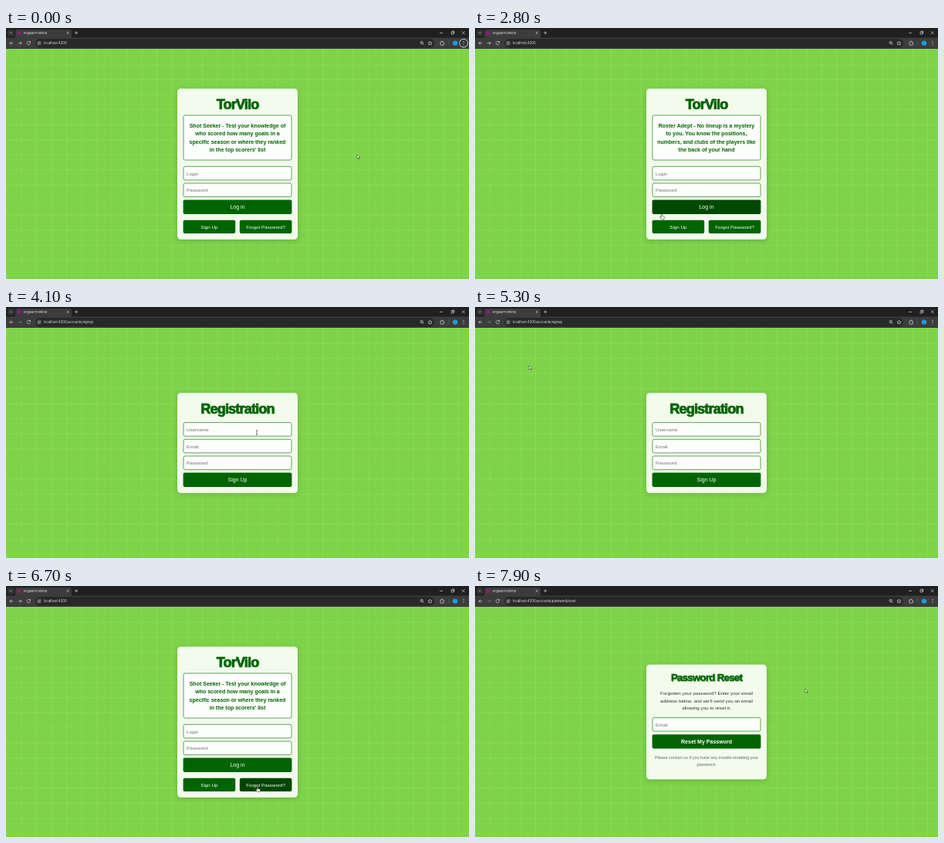
An HTML page that plays this animation: 600x325 px, repeating every 8 s.

```html
<!DOCTYPE html>
<html lang="en">
<head>
<meta charset="utf-8">
<title>Quiz login</title>
<style>
html, body { margin: 0; width: 100%; height: 100%; overflow: hidden; background: #7ed348; }
svg { display: block; width: 600px; height: 325px; }
text { font-family: "Liberation Sans", Arial, sans-serif; font-size: 6.25px; }
.mid { text-anchor: middle; }
.title { font-size: 18px; font-weight: 700; letter-spacing: -.8px; fill: #006400; stroke: #006400; stroke-width: .7px; }
.title.small { font-size: 13.3px; letter-spacing: -.75px; stroke-width: .5px; }
.quote { font-size: 7.03px; font-weight: 700; fill: #006400; }
.hint { fill: #757575; }
.big { font-size: 7.03px; }
.bold { font-weight: 700; }
.btn { fill: #fff; }
.body { fill: #333; }
.note { font-size: 5.47px; fill: #666; }
.ui { font-family: Inter, "Open Sans", sans-serif; font-size: 4.2px; fill: #e3e3e3; }
.icon { fill: none; stroke: #d0d0d0; stroke-width: .7; }
</style>
</head>
<body>
<svg viewBox="0 0 600 325">
  <defs>
    <pattern id="grid" width="19.53" height="19.53" y="27" patternUnits="userSpaceOnUse">
      <path d="M0 .4H19.53M.4 0V19.53" stroke="#fff" stroke-opacity=".13" stroke-width=".8"/>
    </pattern>
    <filter id="shade" x="-15%" y="-15%" width="130%" height="130%">
      <feDropShadow dx="0" dy="1.5" stdDeviation="3" flood-color="#000" flood-opacity=".18"/>
    </filter>
  </defs>

  <rect y="27" width="600" height="298" fill="#7ed348"/>
  <rect y="27" width="600" height="298" fill="url(#grid)"/>
  <g id="pages"></g>

  <rect width="600" height="13" fill="#1f2020"/>
  <rect y="12.5" width="600" height="14.5" fill="#3c3c3c"/>
  <rect x="2" y="2" width="8.5" height="8.5" rx="2.5" fill="#333"/>
  <path d="M12 13V4.5Q12 2 14.500 2H82.500Q85 2 85 4.500V13Z" fill="#3c3c3c"/>
  <path class="icon" d="M4.800 5.600l1.500 1.500 1.500-1.500M78.700 5l2.800 2.800m0-2.800l-2.800 2.800M89 6.300h4.200M91.100 4.200v4.200"/>
  <circle cx="17" cy="6.400" r="2.500" fill="#8f1b83"/>
  <text class="ui" x="22.500" y="7.900" style="font-size:3.9px">AngularFrontend</text>
  <path class="icon" d="M562 6.400h4M577 5.200h2.800v2.800H577zM578 5.200v-1h2.800v2.800h-1M590.800 4.400l3.800 3.800m0-3.800l-3.800 3.800"/>

  <rect x="38" y="14" width="517" height="11.500" rx="5.700" fill="#282828"/>
  <circle id="backGlow" cx="7" cy="19.600" r="5.700" fill="#858585"/>
  <path class="icon" d="M9.300 19.600H4.900m2-2l-2 2 2 2"/>
  <path class="icon" id="forward" d="M15.900 19.600h4.400m-2-2l2 2-2 2"/>
  <path class="icon" d="M31.300 18.500a2.200 2.200 0 1 0 .1 1.800M31.500 17v1.700h-1.700"/>
  <circle cx="43" cy="19.600" r="3.700" fill="#3c3c3c"/>
  <path class="icon" stroke-width=".5" d="M41.200 18.500h2M42.800 20.700h2"/>
  <circle cx="44.100" cy="18.500" r=".7" fill="#d0d0d0"/>
  <circle cx="41.900" cy="20.700" r=".7" fill="#d0d0d0"/>
  <text class="ui" x="49" y="21.200" id="address"></text>
  <g class="icon">
    <circle cx="538.700" cy="19" r="1.700"/>
    <path d="M540 20.300l1.800 1.800M538 19h1.400"/>
    <path d="M549.500 17.100l.8 1.700 1.800.2-1.300 1.200.3 1.800-1.600-.9-1.600.9.3-1.800-1.300-1.200 1.800-.2z"/>
    <path d="M563 18h1.300v-.8h1.400v.8h1.300v1.300h.7v1.300H567v1.500h-4z"/>
    <path d="M573.500 16.500v6" stroke="#5a5a5a"/>
  </g>
  <circle cx="582" cy="19.600" r="3.200" fill="#1e9be0"/>
  <circle id="ring" cx="593" cy="19.600" r="5.300" fill="#333" stroke="#c4dcf4" stroke-width=".9"/>
  <path d="M593 17.400v.01M593 19.600v.01M593 21.800v.01" stroke="#dedede" stroke-width="1.100" stroke-linecap="round"/>

  <g id="cursor">
    <path id="arrow" d="M0 0V5l1.200-1 .8 1.700.9-.4-.8-1.700H3.700Z" fill="#fff" stroke="#222" stroke-width=".5"/>
    <path id="hand" d="M-.6.400Q0-.3.600.4V2.600l2.200.5q.8.200.7 1L3 6.500H-.4L-2.300 3.900q0-.9.800-.6l.9.800Z" fill="#fff" stroke="#222" stroke-width=".5"/>
    <path id="beam" d="M-1.200-2.600H1.200M0-2.600V2.600M-1.200 2.600H1.200" fill="none" stroke="#222" stroke-width=".6"/>
  </g>
</svg>
<script>
const $ = id => document.getElementById(id);
const LOOP = 8000, STEP = 100;

// Page building blocks
const label = (cls, y, str, x = 300) => `<text class="${cls}" x="${x}" y="${y}">${str}</text>`;
const lines = (cls, y, gap, list) => list.map((s, i) => label("mid " + cls, y + i * gap, s)).join("");
const card = (y, h) =>
  `<rect x="222" y="${y}" width="156" height="${h}" rx="4.500" fill="#f2fbec" filter="url(#shade)"/>`;
const box = (y, h) =>
  `<rect x="230" y="${y}" width="140" height="${h}" rx="2" fill="#fcfefb" stroke="#3c8f35" stroke-width=".8"/>`;
const field = (y, str) => box(y, 17.6) + label("hint", y + 11.2, str, 234);
const title = (cls, y, str) =>
  `<g transform="translate(.6 .6)" opacity=".3">${label("mid title " + cls, y, str)}</g>` +
  label("mid title " + cls, y, str);
const button = (id, x, y, w, h, cls, str) =>
  `<rect id="${id}" x="${x}" y="${y}" width="${w}" height="${h}" rx="2" fill="#006400"/>` +
  label("mid btn " + cls, y + h / 2 + 2.4, str, x + w / 2);

const quotes = [
  ["Shot Seeker - Test your knowledge of", "who scored how many goals in a",
   "specific season or where they ranked", "in the top scorers' list"],
  ["Roster Adept - No lineup is a mystery", "to you. You know the positions,",
   "numbers, and clubs of the players like", "the back of your hand"]
];
const pages = {
  login: card(78.5, 195.3) + title("", 104.5, "TorVilo") + box(113, 58) +
    quotes.map((q, i) => `<g id="quote${i}">${lines("quote", 128.5, 10.5, q)}</g>`).join("") +
    field(179.3, "Login") + field(201, "Password") +
    button("enter", 229.6, 222.5, 140.8, 18.5, "big", "Log in") +
    button("join", 229.6, 248.8, 67.6, 17.2, "", "Sign Up") +
    button("forgot", 302.8, 248.8, 67.6, 17.2, "", "Forgot Password?"),
  signup: card(111.2, 129.6) + title("", 137.5, "Registration") +
    field(149.6, "Username") + field(171.3, "Email") + field(193, "Password") +
    button("send", 229.6, 214.6, 140.8, 18.5, "big", "Sign Up"),
  reset: card(101.8, 148.4) + title("small", 123, "Password Reset") +
    lines("body", 141.3, 9.4, ["Forgotten your password? Enter your email",
      "address below, and we'll send you an email", "allowing you to reset it."]) +
    field(170.4, "Email") +
    button("renew", 229.6, 192.2, 140.8, 18.2, "big bold", "Reset My Password") +
    lines("note", 224, 8.5, ["Please contact us if you have any trouble resetting your", "password."])
};
$("pages").innerHTML = Object.entries(pages).map(([k, v]) => `<g id="${k}">${v}</g>`).join("");

// Timeline: [ms, x, y] for the pointer; [ms, page, path] for the views
const path = [
  [0, 455, 164], [700, 455, 164], [1100, 405, 208], [1400, 352, 250], [1600, 331, 258],
  [1900, 312, 279.5], [2200, 286, 262], [2500, 256, 236], [2800, 242, 241], [3000, 250, 253],
  [3300, 262, 257], [3700, 262, 257], [3900, 300, 200], [4100, 325, 162.5], [4300, 338, 190],
  [4400, 338, 196], [4600, 262, 180], [4900, 135, 134], [5000, 135, 134], [5300, 70, 76],
  [5700, 11, 25], [5900, 11, 25], [6200, 120, 115], [6500, 290, 245], [6700, 326, 260],
  [7000, 326, 260], [7300, 405, 246], [7600, 465, 212], [7900, 428, 133], [8000, 428, 133]
];
const views = [
  [0, "login", ""], [3700, "signup", "/accounts/signup"],
  [5900, "login", ""], [7000, "reset", "/accounts/password/reset"]
];
const hovers = {
  enter: [[2350, 2780]],
  join: [[2130, 2340], [2850, 3700]],
  forgot: [[1380, 1640], [6500, 7000]]
};
const beams = [[3950, 4150], [4250, 4650]];

const within = (t, spans) => spans.some(([a, b]) => t >= a && t < b);
const show = (id, on) => $(id).style.display = on ? "" : "none";
const clamp = v => Math.max(0, Math.min(1, v));

function pointAt(t) {
  const i = Math.max(1, path.findIndex(p => p[0] > t));
  const [t0, x0, y0] = path[i - 1], [t1, x1, y1] = path[i];
  const k = (t - t0) / (t1 - t0);
  return [x0 + (x1 - x0) * k, y0 + (y1 - y0) * k];
}

function draw(t) {
  const view = views.filter(v => v[0] <= t).pop();
  Object.keys(pages).forEach(k => show(k, k === view[1]));
  $("address").textContent = "localhost:4200" + view[2];
  const second = t >= 2300 && t < 3700;
  show("quote0", !second);
  show("quote1", second);

  for (const id in hovers) {
    const k = Math.max(...hovers[id].map(([a, b]) => clamp(Math.min((t - a) / 200, 1 - (t - b) / 240))));
    $(id).setAttribute("fill", `rgb(0,${Math.round(100 - 30 * k)},0)`);
  }

  $("forward").style.opacity = view[1] === "login" ? 1 : .4;
  $("backGlow").style.opacity = t < 6000 ? clamp((t - 5600) / 200) : clamp((6200 - t) / 200);
  show("ring", t < 2600);

  const hand = within(t, Object.values(hovers).flat()) || (t >= 2700 && t < 2900);
  const beam = within(t, beams);
  show("hand", hand);
  show("beam", beam);
  show("arrow", !hand && !beam);
  const [x, y] = pointAt(t);
  $("cursor").setAttribute("transform", `translate(${x.toFixed(2)} ${y.toFixed(2)})`);
}

const start = performance.now();
function tick() {
  const t = (performance.now() - start) % LOOP;
  draw(Math.floor(t / STEP) * STEP);
  requestAnimationFrame(tick);
}
tick();
</script>
</body>
</html>
```
